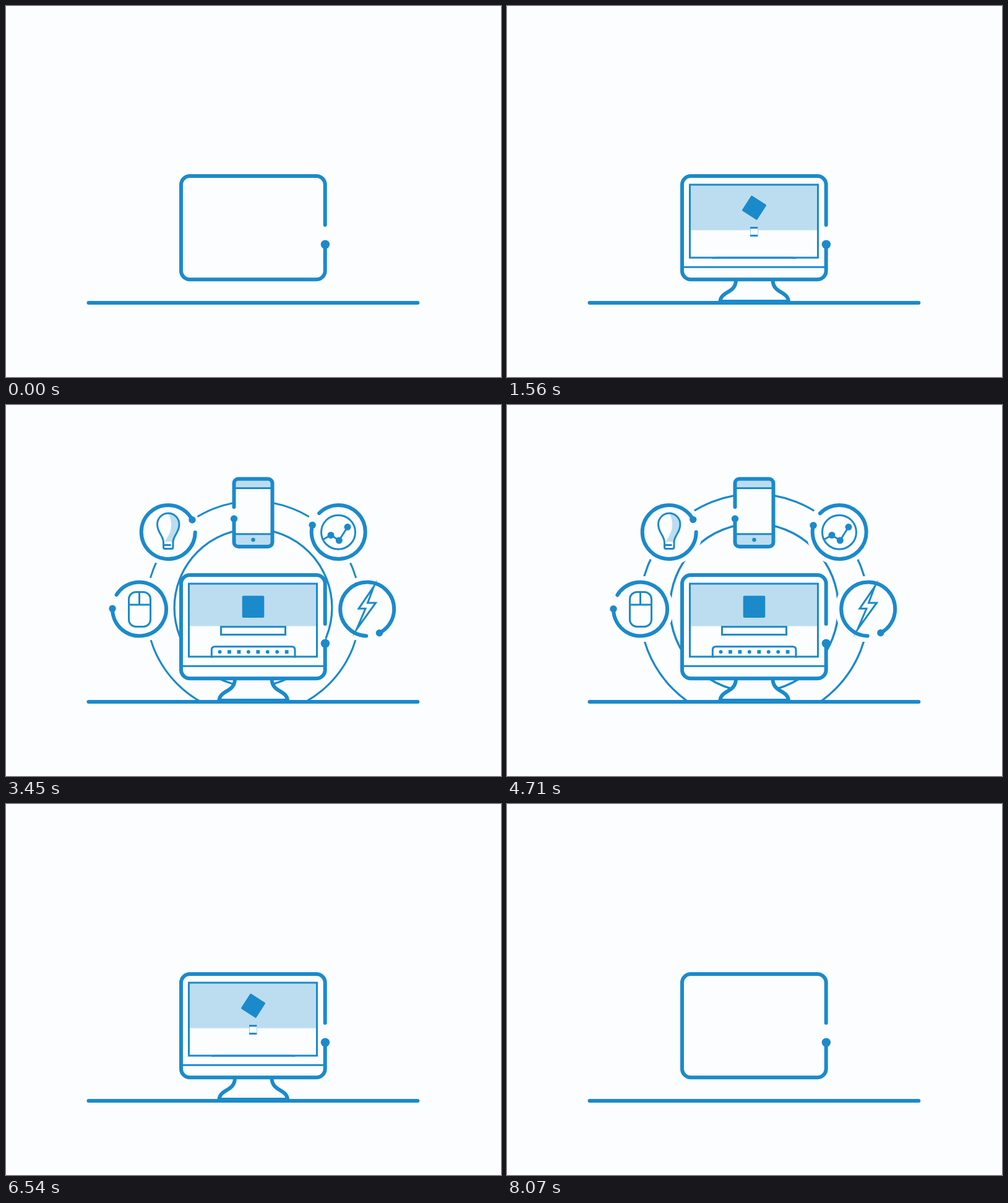
Write an HTML page that moves like this. It is 800 px wide and 600 px high and loops after 8130 ms.

```html
<!DOCTYPE html>
<html lang="en">
<head>
<meta charset="utf-8">
<title>Desktop and devices</title>
<style>
  html, body { margin: 0; width: 100%; height: 100%; overflow: hidden; background: #fcfdff; }
  svg { display: block; width: 100%; height: 100%; }
  .thick, .thin { fill: none; stroke: #1b8acb; }
  .thick { stroke-width: 6; stroke-linecap: round; }
  .thin { stroke-width: 3; }
  .solid { fill: #1b8acb; }
  .light { fill: #bcddf0; }
  .paper { fill: #fcfdff; }
</style>
</head>
<body>
<svg viewBox="0 0 800 600">
  <clipPath id="aboveGround"><rect width="800" height="479"/></clipPath>
  <clipPath id="insideScreen"><rect x="294" y="287" width="210" height="121.7"/></clipPath>

  <g clip-path="url(#aboveGround)">
    <circle id="outerOrbit" class="thin" cx="399.5" cy="328.8"/>
    <circle id="innerOrbit" class="thin" cx="399.5" cy="327.8"/>
  </g>
  <g id="rings"></g>

  <g id="mouse" class="thin">
    <rect id="mouseBody" pathLength="1" x="198.5" y="302.5" width="35" height="56" rx="11.5"/>
    <path id="mouseLine" d="M198.5 323h35"/>
    <path id="mouseSplit" pathLength="1" d="M215.5 323v-20"/>
  </g>

  <path id="bulbShade" class="light" d="M262 175c10 0 17.7 8 17.7 18c0 14-9 17-9.5 28h-13.500c5-9 10.300-15 10.300-27c0-8-2-14-5-19z"/>
  <g class="thin">
    <path id="bulbGlass" pathLength="1" d="M254.500 222c-.5-12-10-15-10-29a17.700 18 0 0 1 35.400 0c0 14-9.500 17-10 29"/>
    <path id="bulbBase" pathLength="1" d="M254.500 221v9q0 2.500 2.500 2.500h10.500q2.500 0 2.500-2.500v-9"/>
    <path id="bulbThread" pathLength="1" d="M255 226.500h11.500"/>
  </g>

  <circle id="chartRim" class="thin" pathLength="1" cx="537" cy="205.700" r="27.500"/>
  <path id="chartLine" class="thin" pathLength="1" d="M512.500 217.500L525 210.500L538.300 219L552 197.300"/>
  <g id="chartDots" class="solid">
    <circle cx="525" cy="210.500"/><circle cx="538.300" cy="219"/><circle cx="552" cy="197.300"/>
  </g>

  <path id="bolt" class="thin" stroke-miterlimit="12" pathLength="1" d="M566.500 363L581 329.300H570L594.500 293.500L584.500 320H597.500Z"/>

  <rect class="paper" x="368" y="119" width="63" height="110" rx="7"/>
  <rect id="phoneTop" class="light" x="371" y="122" width="57" height="12.500"/>
  <path id="phoneTopLine" class="thin" d="M371 134.500h57"/>
  <rect id="phoneFoot" class="light" x="371" y="209" width="57" height="17.500"/>
  <path id="phoneFootLine" class="thin" d="M371 208.700h57"/>
  <circle id="phoneButton" class="solid" cx="399.500" cy="218"/>
  <path id="phoneFrame" class="thick" d="M368.500 165V126.500a7 7 0 0 1 7-7H423.500a7 7 0 0 1 7 7V222a7 7 0 0 1-7 7H375.500a7 7 0 0 1-7-7V184"/>
  <circle id="phoneDot" class="solid" r="5.700"/>

  <g clip-path="url(#aboveGround)">
    <path id="stand" class="thick paper" style="fill:#fcfdff" d="M370 443c0 22-25 18-25.500 35h110.500c-.5-17-25.500-13-25.500-35"/>
  </g>
  <path class="thick" d="M133.500 480H665.300"/>

  <rect class="paper" x="283" y="275" width="233" height="167" rx="14"/>
  <rect id="banner" class="light" x="297" y="290" width="204"/>
  <g id="keyboard" clip-path="url(#insideScreen)"><g id="keys">
    <path class="thin" d="M332.300 430V396q0-5.300 5.300-5.300H461.700q5.300 0 5.300 5.300V430"/>
  </g></g>
  <rect id="screen" class="thin"/>
  <rect id="searchBar" class="thin" style="fill:#fcfdff" x="347.500" y="358.700" width="104" height="12.700"/>
  <rect id="tile" class="solid" x="-17.800" y="-17.800" width="35.600" height="35.600" rx="2"/>
  <path id="chin" class="thin" d="M284 422.200H515"/>
  <path class="thick" d="M515.700 354V289a14 14 0 0 0-14-14H297a14 14 0 0 0-14 14V428.300a14 14 0 0 0 14 14H501.700a14 14 0 0 0 14-14V386"/>
  <circle class="solid" cx="515.900" cy="385.600" r="7.200"/>
</svg>

<script>
const $ = id => document.getElementById(id);
const set = (el, attrs) => { for (const k in attrs) el.setAttribute(k, attrs[k]); };
const make = (parent, tag, attrs) => {
  const el = document.createElementNS("http://www.w3.org/2000/svg", tag);
  set(el, attrs);
  return parent.appendChild(el);
};
const show = (el, on) => { el.style.display = on ? "" : "none"; };

const LOOP = 8130, STEP = 30, END = 3450, MIRROR = 8100;
const CENTER = 399.5;

const span = (t, from, to) => Math.min(1, Math.max(0, (t - from) / (to - from)));
const sineOut = x => Math.sin(x * Math.PI / 2);
const quadInOut = x => x < .5 ? 2 * x * x : 1 - 2 * (1 - x) ** 2;
const easeOut = (t, from, to) => sineOut(span(t, from, to));
const easeBoth = (t, from, to) => quadInOut(span(t, from, to));

// Linear growth followed by a decaying swing that carries on its speed.
function spring(t, from, to) {
  if (t < to) return span(t, from, to);
  const s = (t - to) / 1000;
  return 1 + 100 / (to - from) * Math.sin(2 * Math.PI * s) * Math.exp(-2 * s);
}

function trim(id, p) {
  const el = $(id);
  show(el, p > 0);
  set(el, { "stroke-dasharray": p < 1 ? `${p} 2` : "none" });
}

function widen(id, p, cx = CENTER) {
  show($(id), p > 0);
  set($(id), { transform: `translate(${cx} 0) scale(${p} 1) translate(${-cx} 0)` });
}

const rings = [
  { x: 215.5, y: 330, tail: 212, arc: 329, start: 1690 },
  { x: 262.2, y: 205.5, tail: .5, arc: 332.5, start: 1780 },
  { x: 537.2, y: 205.5, tail: 224.5, arc: 330.5, start: 1955 },
  { x: 583.7, y: 330, tail: 92, arc: 331, start: 2078 }
];
const RING_TIME = 1164, RING_R = 43.5;
for (const ring of rings) {
  make($("rings"), "circle", { class: "paper", cx: ring.x, cy: ring.y, r: 53.5 });
  ring.line = make($("rings"), "circle", { class: "thick", cx: ring.x, cy: ring.y, r: RING_R, pathLength: 360 });
  ring.dot = make($("rings"), "circle", { class: "solid", r: 5.7 });
}

[..."ossosoos"].forEach((kind, i) => {
  const x = 345.5 + i * 15.45, y = 399.2;
  if (kind === "o") make($("keys"), "circle", { class: "solid", cx: x, cy: y, r: 2.9 });
  else make($("keys"), "rect", { class: "solid", x: x - 2.9, y: y - 2.9, width: 5.8, height: 5.8 });
});

function drawMonitor(t) {
  const w = 207 * easeBoth(t, 30, 400), h = 118 * easeBoth(t, 350, 850);
  show($("screen"), w > 0);
  set($("screen"), { x: 399 - w / 2, y: 348 - h / 2, width: w, height: h });

  const drop = -38 * (1 - easeOut(t, 500, 960));
  set($("stand"), { transform: `translate(0 ${drop})` });
  widen("chin", easeOut(t, 900, 1300));
  set($("banner"), { height: 67.3 * spring(t, 900, 1130) });

  const p = easeOut(t, 1200, 1790);
  set($("tile"), { transform: `translate(399.500 326.300) rotate(${180 * (1 - p)}) scale(${p})` });
  widen("searchBar", easeOut(t, 1530, 1930));
  show($("keyboard"), t >= 1530);
  set($("keys"), { transform: `translate(0 ${17.5 * (1 - easeOut(t, 1545, 2000))})` });
}

function drawRings(t) {
  for (const { x, y, tail, arc, start, line, dot } of rings) {
    const angle = tail - 5.2 * (END - t) / 510;
    const drawn = arc * easeOut(t, start, start + RING_TIME);
    const head = (angle + drawn) * Math.PI / 180;
    show(line, drawn > 0);
    show(dot, drawn > 0);
    set(line, { transform: `rotate(${angle} ${x} ${y})`, "stroke-dasharray": `${drawn} 720` });
    set(dot, { cx: x + RING_R * Math.cos(head), cy: y + RING_R * Math.sin(head) });
  }
}

function drawPhone(t) {
  const frame = $("phoneFrame"), length = frame.getTotalLength();
  const drawn = length * easeOut(t, 1869, 3033);
  const head = frame.getPointAtLength(drawn);
  show(frame, drawn > 0);
  show($("phoneDot"), drawn > 0);
  set(frame, { "stroke-dasharray": `${drawn} ${length * 2}` });
  set($("phoneDot"), { cx: head.x, cy: head.y });

  widen("phoneTop", easeOut(t, 2620, 2920));
  widen("phoneTopLine", easeOut(t, 2825, 3130));
  widen("phoneFoot", easeOut(t, 2897, 3200));
  widen("phoneFootLine", easeOut(t, 2930, 3240));
  set($("phoneButton"), { r: 3.2 * easeOut(t, 3050, 3300) });
}

function drawIcons(t) {
  trim("mouseBody", easeBoth(t, 2250, 2780));
  widen("mouseLine", easeOut(t, 2740, 2990), 216);
  trim("mouseSplit", easeOut(t, 2910, 3200));

  trim("bulbGlass", easeBoth(t, 2250, 2750));
  trim("bulbBase", easeBoth(t, 2550, 2820));
  trim("bulbThread", easeOut(t, 2700, 2900));
  set($("bulbShade"), { opacity: span(t, 2600, 2850) });

  trim("chartRim", easeBoth(t, 2350, 2850));
  const line = span(t, 2780, 3240);
  trim("chartLine", line);
  [...$("chartDots").children].forEach((dot, i) => {
    const reached = [.2, .53, .9][i];
    set(dot, { r: 5.5 * sineOut(span(line, reached, reached + .1)) });
  });

  // The bolt grows down both sides from its upper tip.
  const p = easeOut(t, 2700, 3230);
  show($("bolt"), p > 0);
  const skip = .507 * (1 - p);
  set($("bolt"), { "stroke-dasharray": p < 1 ? `0 ${skip} ${p} 2` : "none" });
}

function drawOrbits(t) {
  const orbit = (id, radius, from, to) => {
    const p = spring(t, from, to);
    set($(id), { r: radius * p });
    $(id).style.strokeWidth = 3 * p;
  };
  orbit("outerOrbit", 170.8, 2736, 2964);
  orbit("innerOrbit", 117.8, 2794, 3022);
}

function frame() {
  const now = Math.floor(performance.now() % LOOP / STEP) * STEP;
  const t = Math.min(now, MIRROR - now, END);
  drawMonitor(t);
  drawRings(t);
  drawPhone(t);
  drawIcons(t);
  drawOrbits(t);
  requestAnimationFrame(frame);
}
frame();
</script>
</body>
</html>
```
